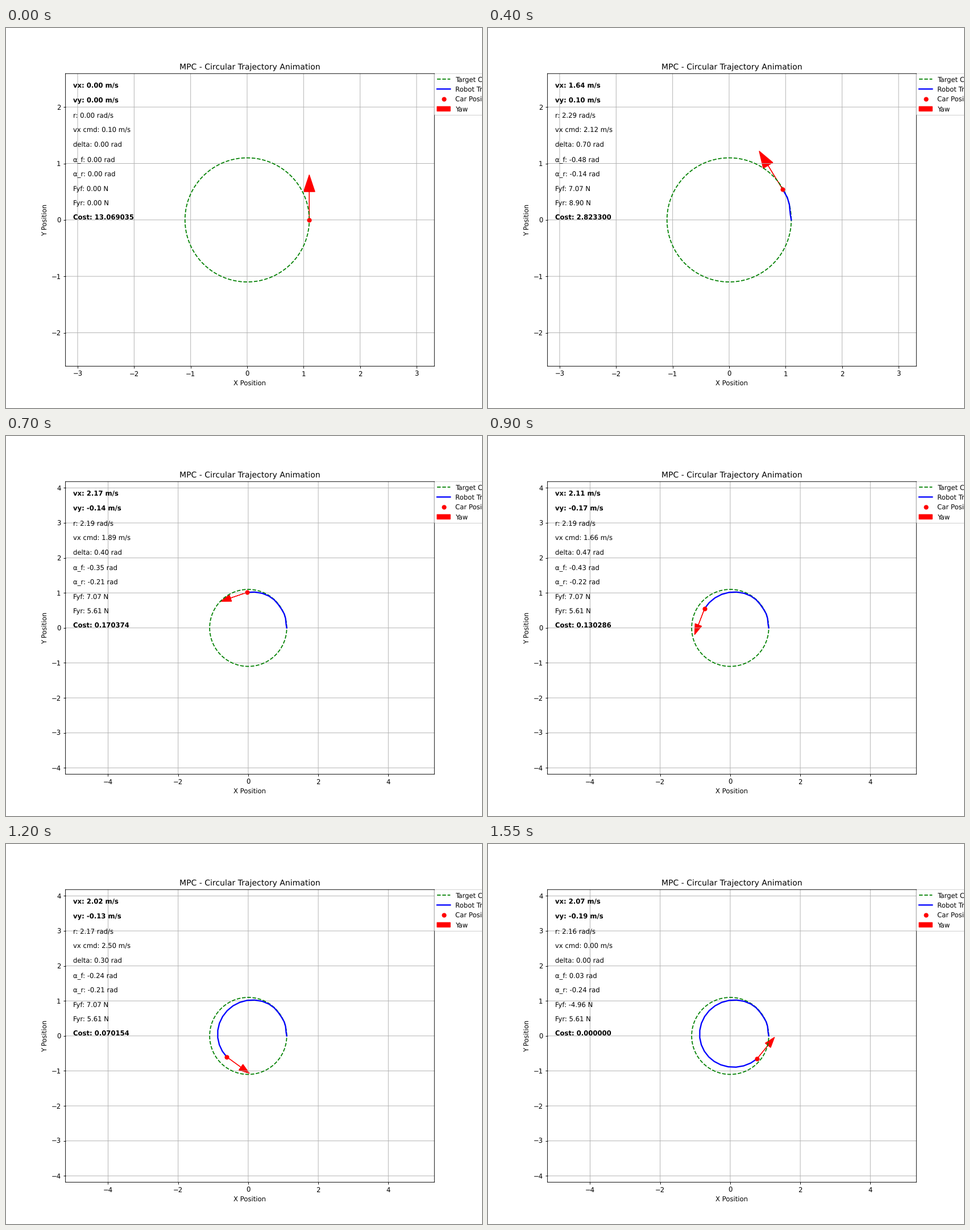
A matplotlib script that plays this animation: 837 px wide and 669 px high, repeating every 1.6 s.

```python
import numpy as np
import matplotlib.pyplot as plt
from matplotlib.animation import FuncAnimation

plt.rcParams.update({
    "font.family": "DejaVu Sans",
    "text.hinting": "none",  # keep text metrics proportional at this dpi
    "path.snap": False,
})

FRAMES, INTERVAL = 32, 50
DT = 0.1
RADIUS = 1.1
FRONT, REAR = 0.113, 0.142  # axle distances from the car's centre
ZOOM_MARGIN = 2

steps = np.arange(FRAMES)


def track(*points):
    """Linear interpolation over all steps through (step, value) points."""
    return np.interp(steps, *zip(*points))


def integrate(start, rate):
    """Explicit Euler sum of a rate."""
    return start + DT * np.concatenate([[0], np.cumsum(rate[:-1])])


# Body velocities: a jerky start, then a nearly steady turn
vx = track((0, 0), (2, 0.25), (5, 1.05), (7, 1.58), (9, 1.70), (12, 2.20),
           (18, 2.11), (24, 2.02), (27, 2.25), (31, 2.07))
vy = track((0, 0), (3, 0.06), (5, -0.08), (7, 0.31), (9, -0.11),
           (18, -0.17), (24, -0.13), (31, -0.19))
r = track((0, 0), (3, 0.60), (5, 0.31), (7, 2.25), (9, 2.34), (11, 2.20), (31, 2.16))

# Controls
vx_cmd = track((0, 0.10), (5, 1.96), (9, 2.17), (18, 1.66), (24, 2.50), (30, 2), (31, 0))
delta = track((0, 0), (1, 0.70), (9, 0.70), (14, 0.40), (18, 0.47),
              (24, 0.30), (30, 0.40), (31, 0))
cost = track((0, 13.069035), (5, 4.200070), (9, 2.364376), (14, 0.170374), (31, 0))

# Bicycle model: pose, slip angles and saturating tyre forces
yaw = integrate(np.pi / 2, r)
px = integrate(RADIUS, vx * np.cos(yaw) - vy * np.sin(yaw))
py = integrate(0, vx * np.sin(yaw) + vy * np.cos(yaw))
slip_front = np.arctan2(vy + FRONT * r, vx) - delta
slip_rear = np.arctan2(vy - REAR * r, vx)
force_front = np.clip(-190 * slip_front, -7.07, 7.07)
force_rear = np.where(slip_rear < -0.15, 5.61, -65 * slip_rear)

READOUT = [
    ("vx: {:.2f} m/s", vx),
    ("vy: {:.2f} m/s", vy),
    ("r: {:.2f} rad/s", r),
    ("vx cmd: {:.2f} m/s", vx_cmd),
    ("delta: {:.2f} rad", delta),
    ("α_f: {:.2f} rad", slip_front),
    ("α_r: {:.2f} rad", slip_rear),
    ("Fyf: {:.2f} N", force_front),
    ("Fyr: {:.2f} N", force_rear),
    ("Cost: {:.6f}", cost),
]
BOLD = ("vx:", "vy:", "Cost:")

fig, ax = plt.subplots(figsize=(10, 7.993), dpi=83.7)
ax.set_title("MPC - Circular Trajectory Animation")
ax.set_xlabel("X Position")
ax.set_ylabel("Y Position")
ax.grid(True)

theta = np.linspace(0, 2 * np.pi, 200)
ax.plot(RADIUS * np.cos(theta), RADIUS * np.sin(theta), "g--", label="Target Circle")
trail, = ax.plot([], [], "b-", lw=2, label="Robot Trajectory")
car, = ax.plot([], [], "ro", label="Car Position")
arrow = ax.arrow(RADIUS, 0, 0, 0.5, head_width=0.2, head_length=0.3,
                 fc="red", ec="red", label="Yaw")
ax.legend(loc="upper left", bbox_to_anchor=(1, 1), borderaxespad=0)

labels = [
    ax.text(0.02, 0.95 - 0.05 * row, "", transform=ax.transAxes, fontsize=10,
            fontweight="bold" if fmt.startswith(BOLD) else "normal")
    for row, (fmt, _) in enumerate(READOUT)
]


def set_view(pad):
    """Equal-aspect view, padded around the circle and the first arrow."""
    left, right = -1.215 - pad, 1.315 + pad
    box = ax.get_window_extent()
    half = (right - left) * box.height / box.width / 2
    ax.set_xlim(left, right)
    ax.set_ylim(-half, half)
    return half


def update(i):
    # The view widens for good once the car nears its upper edge
    if set_view(2) - py[:i + 1].max() < ZOOM_MARGIN:
        set_view(4)
    trail.set_data(px[:i + 1], py[:i + 1])
    car.set_data([px[i]], [py[i]])
    arrow.set_data(x=px[i], y=py[i],
                   dx=0.5 * np.cos(yaw[i]), dy=0.5 * np.sin(yaw[i]))
    for label, (fmt, values) in zip(labels, READOUT):
        label.set_text(fmt.format(values[i] + 0.0))  # no negative zero
    return [trail, car, arrow, *labels]


anim = FuncAnimation(fig, update, frames=FRAMES, interval=INTERVAL,
                     init_func=lambda: update(0), blit=False, repeat=True)
plt.show()
```
